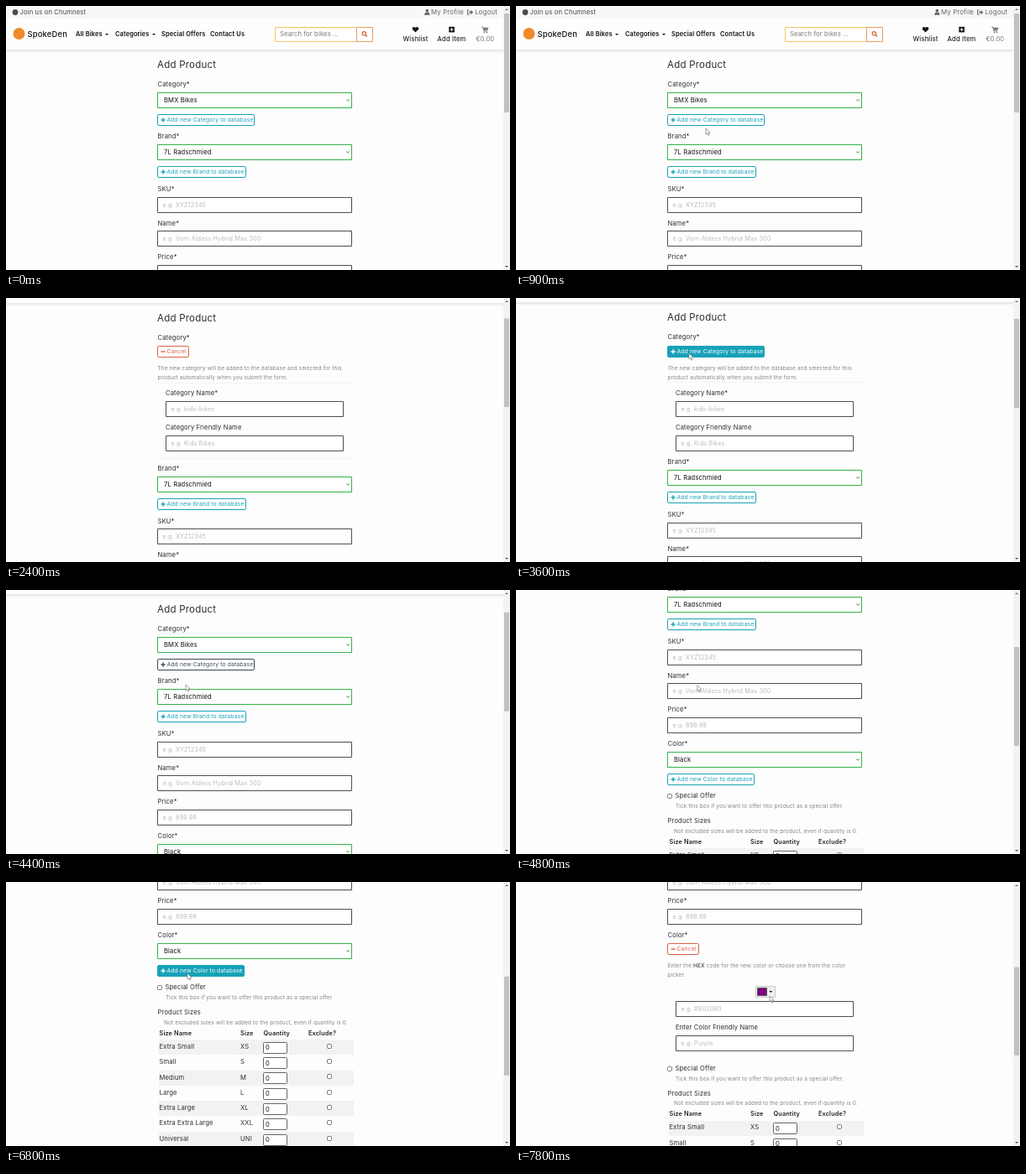
Recreate the animation shown at these times as an HTML page with a canvas. Size 600 px wide and 315 px high, loop 8000 ms.

```html
<!DOCTYPE html>
<html lang="en">
<head>
<meta charset="utf-8">
<title>Add Product</title>
<style>
  html, body { margin: 0; width: 100%; height: 100%; overflow: hidden; background: #fdfdfd; }
  canvas { display: block; width: 600px; height: 315px; }
</style>
</head>
<body>
<canvas id="stage"></canvas>
<script>
const W = 600, H = 315, LOOP = 8000;
const TEAL = '#17a2b8', RED = '#dc6248', GREEN = '#35b24a', INK = '#2b2e31', GREY = '#808589';
const canvas = document.getElementById('stage');
const ctx = canvas.getContext('2d');
const dpr = window.devicePixelRatio || 1;
canvas.width = W * dpr;
canvas.height = H * dpr;

// Timing helpers
const clamp = v => Math.max(0, Math.min(1, v));
const swing = p => 0.5 - Math.cos(Math.PI * clamp(p)) / 2;
const ramp = (t, start, dur) => swing((t - start) / dur);
const between = (t, a, b) => t >= a && t < b;

function track(keys, t) {
  if (t <= keys[0][0]) return keys[0].slice(1);
  for (let i = 1; i < keys.length; i++) {
    const a = keys[i - 1], b = keys[i];
    if (t <= b[0]) {
      const p = swing((t - a[0]) / (b[0] - a[0]));
      return a.slice(1).map((v, k) => v + (b[k + 1] - v) * p);
    }
  }
  return keys[keys.length - 1].slice(1);
}

// Moments of the three clicks, and how long the parts take to fold
const OPEN_CAT = 1460, CLOSE_CAT = 3545, OPEN_COLOR = 6830;
const FADE = 600, SLIDE = 360;

const scrollKeys = [
  [2230, 0], [2400, 46], [2480, 47], [4400, 47], [4560, 92], [4720, 138],
  [4900, 184], [5080, 230], [5560, 230], [5600, 236], [5720, 277]
];
const pointerKeys = [
  [100, 352, 214], [900, 226, 146], [1000, 226, 146], [1100, 220, 137], [2230, 220, 137],
  [2600, 262, 138], [3200, 212, 80], [3400, 212, 80], [3500, 206, 66], [3850, 206, 66],
  [4200, 214, 113], [4400, 214, 113], [5100, 217, 114], [5880, 217, 114], [6080, 216, 109],
  [7420, 216, 109], [7600, 270, 128], [7680, 284, 132], [7800, 302, 136]
];

// Drawing helpers
function text(str, x, y, o = {}) {
  const size = o.size || 7.6;
  ctx.font = `${o.weight || 400} ${size}px Inter, "Open Sans", sans-serif`;
  ctx.letterSpacing = (size * 0.02).toFixed(2) + 'px';
  ctx.textAlign = o.align || 'left';
  ctx.textBaseline = 'middle';
  ctx.fillStyle = o.color || INK;
  ctx.fillText(str, x, y);
  return ctx.measureText(str).width;
}
const help = (str, x, y) => text(str, x, y, { size: 6.45, color: GREY });

function rect(x, y, w, h, color) {
  ctx.fillStyle = color;
  ctx.fillRect(x, y, w, h);
}
function frame(x, y, w, h, stroke, fill = '#fff', r = 0) {
  ctx.beginPath();
  ctx.roundRect(x + 0.5, Math.floor(y) + 0.5, w, h, r);
  ctx.fillStyle = fill;
  ctx.fill();
  ctx.strokeStyle = stroke;
  ctx.lineWidth = 1;
  ctx.stroke();
}
function disc(x, y, r, color) {
  ctx.beginPath();
  ctx.arc(x, y, r, 0, 7);
  ctx.fillStyle = color;
  ctx.fill();
}
function shape(points, fill) {
  ctx.beginPath();
  points.forEach(([x, y]) => ctx.lineTo(x, y));
  ctx.closePath();
  ctx.fillStyle = fill;
  ctx.fill();
}
function line(points, color, width = 1) {
  ctx.beginPath();
  points.forEach(([x, y]) => ctx.lineTo(x, y));
  ctx.strokeStyle = color;
  ctx.lineWidth = width;
  ctx.stroke();
}
const caret = (x, y, s, color) => shape([[x - s, y - s / 2], [x + s, y - s / 2], [x, y + s / 2]], color);
function clipped(x, y, w, h, draw) {
  ctx.save();
  ctx.beginPath();
  ctx.rect(x, y, w, h);
  ctx.clip();
  draw();
  ctx.restore();
}

// Form parts
function input(y, hint, x = 180, w = 231) {
  frame(x, y, w, 18, '#4c4f52');
  text(hint, x + 6.5, Math.floor(y) + 9.7, { size: 7.3, weight: 300, color: '#a4a8ab' });
}
const innerInput = (y, hint) => input(y, hint, 190, 211);

function select(y, value, k = 1) {
  if (k <= 0.01) return;
  const w = 231 * k, h = 18 * k, top = Math.floor(y);
  ctx.save();
  ctx.globalAlpha = k;
  frame(180, top, w, h, GREEN);
  const cx = 176 + w, cy = top + h / 2;
  line([[cx - 1.8, cy - 0.4], [cx, cy + 1.2], [cx + 1.8, cy - 0.4]], '#444', 0.8);
  clipped(181, top, w, h, () => text(value, 188, top + 10, { color: '#111' }));
  ctx.restore();
}
function button(y, label, w, color, filled, minus) {
  const top = Math.round(y), cy = top + 7;
  frame(180, top, w, 13, color, filled ? color : '#fff', 1.6);
  const ink = filled ? '#fff' : color;
  rect(184.5, cy - 0.7, 5.2, 1.4, ink);
  if (!minus) rect(186.4, cy - 2.6, 1.4, 5.2, ink);
  text(label, 191.5, cy + 0.2, { size: 6.75, color: ink });
}
const cancel = (y, filled) => button(y, 'Cancel', 37, filled ? '#cb5f41' : RED, filled, true);
function check(x, y) {
  frame(x, y, 5, 5, '#777', '#fff', 1);
}

function topBar() {
  rect(0, 0, 592, 15, '#f7f8f9');
  disc(11, 7.5, 3.4, '#4a4d50');
  text('Join us on Chumnest', 16.5, 7.6, { color: '#444' });
  const c = '#666';
  disc(501.3, 5.6, 1.8, c);
  shape([[498, 10.8], [498.6, 8.4], [500, 7.6], [502.6, 7.6], [504, 8.4], [504.6, 10.8]], c);
  text('My Profile', 506, 7.6, { color: c, size: 7.8 });
  line([[551.5, 4.8], [549.5, 4.8], [549.5, 10.2], [551.5, 10.2]], c);
  rect(551, 6.8, 3, 1.5, c);
  shape([[553.3, 4.8], [556.3, 7.5], [553.3, 10.2]], c);
  text('Logout', 558.3, 7.6, { color: c, size: 7.8 });
}

function navBar() {
  const shade = ctx.createLinearGradient(0, 52, 0, 56);
  shade.addColorStop(0, 'rgba(0,0,0,.1)');
  shade.addColorStop(1, 'rgba(0,0,0,0)');
  rect(0, 52, 592, 4, shade);
  rect(0, 15, 592, 37, '#fefefe');
  disc(15.5, 33, 7, '#ee8a2b');
  text('SpokeDen', 25.5, 33.8, { size: 9.4, weight: 500, color: '#111' });

  const bold = { size: 7.4, weight: 600, color: '#111' };
  text('All Bikes', 83, 34.2, bold);
  caret(120, 34, 2, '#111');
  text('Categories', 130, 34.2, bold);
  caret(176, 34, 2, '#111');
  text('Special Offers', 185, 34.2, bold);
  text('Contact Us', 243, 34.2, bold);

  frame(320, 25, 97, 17, '#f3c568');
  text('Search for bikes ...', 326, 34.2, { color: '#777' });
  frame(417, 25, 19, 17, '#ee9a62');
  ctx.beginPath();
  ctx.arc(426.3, 32.8, 2.2, 0, 7);
  ctx.strokeStyle = '#d9652f';
  ctx.lineWidth = 1.2;
  ctx.stroke();
  line([[428, 34.5], [430, 36.6]], '#d9652f', 1.4);

  disc(485.7, 26.9, 2, '#111');
  disc(489.3, 26.9, 2, '#111');
  shape([[483.9, 27.6], [487.5, 26.5], [491.1, 27.6], [487.5, 31.6]], '#111');
  const mid = { size: 7.6, weight: 500, color: '#222', align: 'center' };
  text('Wishlist', 487.5, 39.8, mid);

  rect(527.3, 24.8, 6.6, 6.6, '#111');
  rect(528.6, 27.6, 4, 1, '#fff');
  rect(530.1, 26.1, 1, 4, '#fff');
  text('Add Item', 530.5, 39.8, mid);

  const c = '#6d7680';
  line([[566, 25], [567.6, 25], [568.8, 29.8], [573, 29.8]], c, 0.9);
  shape([[568, 25.8], [574.4, 25.8], [573.4, 28.8], [568.7, 28.8]], c);
  disc(569.4, 31.3, 0.9, c);
  disc(572.6, 31.3, 0.9, c);
  text('€0.00', 570.3, 39.8, { align: 'center', color: '#777' });
}

function categoryForm(y, h) {
  if (h < 0.5) return;
  clipped(178, y, 240, h, () => {
    help('The new category will be added to the database and selected for this', 180.5, y + 9);
    help('product automatically when you submit the form.', 180.5, y + 20);
    rect(181, Math.round(y + 25), 231, 1, '#f1f2f2');
    text('Category Name*', 190, y + 38.7);
    innerInput(y + 48, 'e.g. kids-bikes');
    text('Category Friendly Name', 190, y + 79.5);
    innerInput(y + 89, 'e.g. Kids Bikes');
    rect(181, Math.round(y + 115), 231, 1, '#f1f2f2');
  });
}

function colorForm(y, h) {
  if (h < 0.5) return;
  clipped(178, y, 240, h, () => {
    let x = 180.5;
    x += help('Enter the ', x, y + 9.2);
    x += text('HEX', x, y + 9.2, { size: 6.45, weight: 600, color: '#555' });
    help(' code for the new color or choose one from the color', x, y + 9.2);
    help('picker.', 180.5, y + 20.5);
    const top = Math.floor(y + 33);
    frame(285, top, 23, 13, '#c9c9c9', '#efefef');
    frame(287, top + 2, 11, 9, '#555', '#800080');
    caret(303.3, top + 7, 2, '#111');
    innerInput(y + 51, 'e.g. #802080');
    text('Enter Color Friendly Name', 190, y + 82.5);
    innerInput(y + 92, 'e.g. Purple');
  });
}

const sizes = [['Extra Small', 'XS'], ['Small', 'S'], ['Medium', 'M'], ['Large', 'L'],
  ['Extra Large', 'XL'], ['Extra Extra Large', 'XXL'], ['Universal', 'UNI']];

function sizeTable(y) {
  const head = { size: 7.3, weight: 600, color: '#222' };
  text('Size Name', 182.5, y, head);
  text('Size', 279, y, head);
  text('Quantity', 306.5, y, head);
  text('Exclude?', 360, y, head);
  sizes.forEach(([name, code], i) => {
    const cy = y + 16 + i * 18.3;
    if (i % 2 === 0) rect(182, Math.round(cy - 8.5), 232, 18, '#f2f2f2');
    text(name, 182.5, cy);
    text(code, 279, cy);
    frame(306, cy - 5.5, 28, 13, '#666', '#fff', 1);
    text('0', 309, cy + 1.5, { color: '#111' });
    check(382, cy - 3.5);
  });
}

function arrow(x, y) {
  ctx.save();
  ctx.translate(x, y);
  ctx.lineJoin = 'round';
  ctx.beginPath();
  [[0, 0], [0, 7], [1.7, 5.6], [2.9, 8.2], [4, 7.7], [2.9, 5.2], [5.1, 5]].forEach(p => ctx.lineTo(...p));
  ctx.closePath();
  ctx.fillStyle = '#fff';
  ctx.fill();
  ctx.strokeStyle = '#777';
  ctx.lineWidth = 0.7;
  ctx.stroke();
  ctx.restore();
}

function scrollBar(top, total) {
  rect(592, 0, 8, H, '#f3f3f3');
  caret(596, 311, 2, '#555');
  shape([[594, 5], [598, 5], [596, 3]], '#777');
  const k = 299 / total;
  rect(593, 9 + top * k, 6, H * k, '#c1c1c1');
}

function draw(t) {
  const scroll = track(scrollKeys, t)[0];
  const catSel = 1 - ramp(t, OPEN_CAT, FADE) + ramp(t, CLOSE_CAT, FADE);
  const catForm = 119 * (ramp(t, OPEN_CAT, SLIDE) - ramp(t, CLOSE_CAT, SLIDE));
  const colSel = 1 - ramp(t, OPEN_COLOR, FADE);
  const colForm = 122 * ramp(t, OPEN_COLOR, SLIDE);

  ctx.setTransform(dpr, 0, 0, dpr, 0, 0);
  rect(0, 0, W, H, '#fdfdfd');
  ctx.save();
  ctx.translate(0, -Math.round(scroll));
  topBar();
  navBar();
  text('Add Product', 180, 71, { size: 11.5 });

  text('Category*', 180.5, 94);
  select(103, 'BMX Bikes', catSel);
  const catBtn = 103 + 25.5 * catSel;
  if (between(t, OPEN_CAT, CLOSE_CAT)) {
    cancel(catBtn, t < 1900 || t >= 3480);
  } else {
    const filled = between(t, 1050, OPEN_CAT) || between(t, CLOSE_CAT, 3900);
    button(catBtn, 'Add new Category to database', 115, between(t, 3900, 4550) ? '#3c4650' : TEAL, filled);
  }
  categoryForm(catBtn + 18.5, catForm);

  const d = 25.5 * (catSel - 1) + catForm;
  text('Brand*', 180.5, 156 + d);
  select(165.5 + d, '7L Radschmied');
  button(191 + d, 'Add new Brand to database', 105, TEAL, false);
  text('SKU*', 180.5, 218.8 + d);
  input(228 + d, 'e.g. XYZ12345');
  text('Name*', 180.5, 259.3 + d);
  input(268 + d, 'e.g. Vorn Aldess Hybrid Max 300');
  text('Price*', 180.5, 300 + d);
  input(309 + d, 'e.g. 899.99');
  text('Color*', 180.5, 340.5 + d);
  select(350 + d, 'Black', colSel);

  const colBtn = 350 + 25.5 * colSel + d;
  if (t >= OPEN_COLOR) cancel(colBtn, t < 7350);
  else button(colBtn, 'Add new Color to database', 103, TEAL, t >= 6000);
  colorForm(colBtn + 18, colForm);

  const e = d + 25.5 * (colSel - 1) + colForm;
  check(180, 400.5 + e);
  text('Special Offer', 189.5, 403.2 + e);
  help('Tick this box if you want to offer this product as a special offer.', 190, 415.5 + e);
  text('Product Sizes', 180.5, 433.2 + e);
  help('Not excluded sizes will be added to the product, even if quantity is 0.', 188, 445 + e);
  sizeTable(457.7 + e);
  ctx.restore();

  scrollBar(scroll, 798 + e);
  if (between(t, 100, 2230) || t >= 2600) arrow(...track(pointerKeys, t));
}

const start = performance.now();
function tick() {
  draw((performance.now() - start) % LOOP);
  requestAnimationFrame(tick);
}
tick();
</script>
</body>
</html>
```
